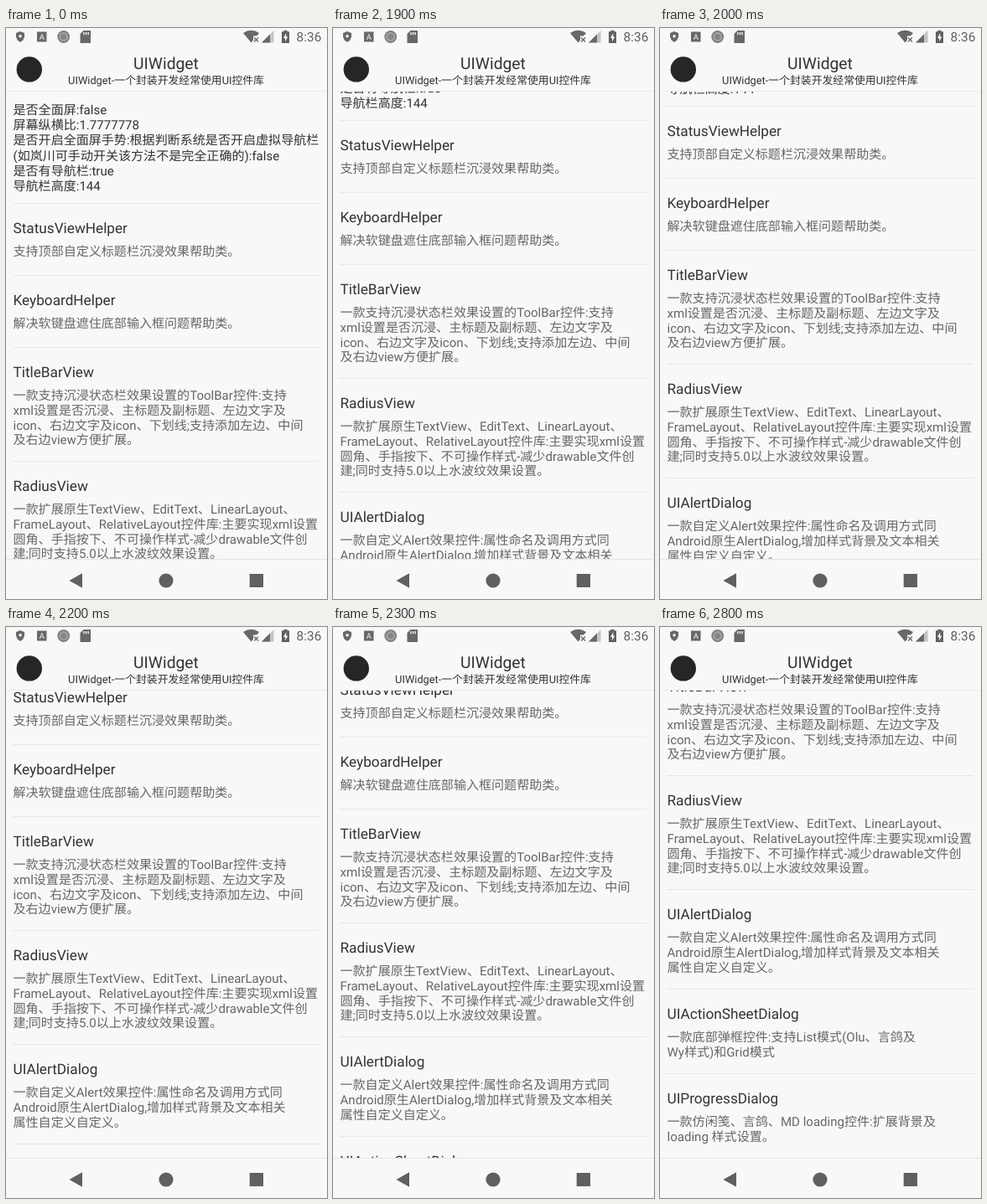
Animation of 383x682 px, one loop 4.1 s. Source, as an HTML page with a canvas:

```html
<!DOCTYPE html>
<html lang="zh-CN">
<head>
<meta charset="utf-8">
<title>UIWidget</title>
<style>
  html, body { margin: 0; width: 100%; height: 100%; overflow: hidden; background: #f8f8f8; }
  canvas { display: block; width: 383px; height: 682px; }
</style>
</head>
<body>
<canvas id="stage"></canvas>
<script>
const W = 383, H = 682, LOOP = 4100;
const LIST_TOP = 76, LIST_BOTTOM = 634, LEFT = 8.5;
const BG = '#f8f8f8', DARK = '#333', GRAY = '#666', LINE = '#e7e7e7', ICON = '#686868';
const FAMILY = 'Roboto, "Noto Sans CJK SC", "Noto Sans CJK", sans-serif';

const canvas = document.getElementById('stage');
const ctx = canvas.getContext('2d');
const dpr = window.devicePixelRatio || 1;
canvas.width = W * dpr;
canvas.height = H * dpr;
ctx.textRendering = 'geometricPrecision'; // keep fractional glyph advances

const info = [
  '是否全面屏:false',
  '屏幕纵横比:1.7777778',
  '是否开启全面屏手势:根据判断系统是否开启虚拟导航栏',
  '(如岚川可手动开关该方法不是完全正确的):false',
  '是否有导航栏:true',
  '导航栏高度:144'
];

const items = [
  ['StatusViewHelper', '支持顶部自定义标题栏沉浸效果帮助类。'],
  ['KeyboardHelper', '解决软键盘遮住底部输入框问题帮助类。'],
  ['TitleBarView',
    '一款支持沉浸状态栏效果设置的ToolBar控件:支持',
    'xml设置是否沉浸、主标题及副标题、左边文字及',
    'icon、右边文字及icon、下划线;支持添加左边、中间',
    '及右边view方便扩展。'],
  ['RadiusView',
    '一款扩展原生TextView、EditText、LinearLayout、',
    'FrameLayout、RelativeLayout控件库:主要实现xml设置',
    '圆角、手指按下、不可操作样式-减少drawable文件创',
    '建;同时支持5.0以上水波纹效果设置。'],
  ['UIAlertDialog',
    '一款自定义Alert效果控件:属性命名及调用方式同',
    'Android原生AlertDialog,增加样式背景及文本相关',
    '属性自定义自定义。'],
  ['UIActionSheetDialog',
    '一款底部弹框控件:支持List模式(Olu、言鸽及',
    'Wy样式)和Grid模式'],
  ['UIProgressDialog',
    '一款仿闲笺、言鸽、MD loading控件:扩展背景及',
    'loading 样式设置。']
];
const itemHeight = [86, 101, 119, 136]; // by number of description lines

const scrollSteps = [
  [0, 0], [1800, 78], [1900, 99], [2000, 116], [2100, 142],
  [2200, 155], [2300, 164], [2700, 262], [2800, 340]
];

function scrollAt(t) {
  let y = 0;
  for (const [start, offset] of scrollSteps) if (t >= start) y = offset;
  return y;
}

function text(str, x, y, size, color, align = 'left') {
  ctx.font = `${size}px ${FAMILY}`;
  ctx.fillStyle = color;
  ctx.textAlign = align;
  ctx.fillText(str, x, y);
}

function rect(x, y, w, h, color) {
  ctx.fillStyle = color;
  ctx.fillRect(x, y, w, h);
}

function disc(x, y, r, color) {
  ctx.fillStyle = color;
  ctx.beginPath();
  ctx.arc(x, y, r, 0, Math.PI * 2);
  ctx.fill();
}

function poly(color, ...pts) {
  ctx.fillStyle = color;
  ctx.beginPath();
  for (let i = 0; i < pts.length; i += 2) ctx.lineTo(pts[i], pts[i + 1]);
  ctx.closePath();
  ctx.fill();
}

function drawList(offset) {
  ctx.save();
  ctx.beginPath();
  ctx.rect(0, LIST_TOP, W, LIST_BOTTOM - LIST_TOP);
  ctx.clip();
  ctx.translate(0, -offset);
  info.forEach((s, i) => text(s, LEFT, 103 + i * 18.2, 15.05, DARK));
  let y = 209;
  for (const [title, ...lines] of items) {
    rect(8, y, 366, 1, LINE);
    text(title, LEFT, y + 36, 17.2, DARK);
    lines.forEach((s, i) => text(s, LEFT, y + 63.3 + i * 17.65, 15.05, GRAY));
    y += itemHeight[lines.length - 1];
  }
  ctx.restore();
}

function drawStatusBar() {
  // shield
  poly(ICON, 17, 4, 22, 6, 22, 10.5, 20.3, 14.5, 17, 17, 13.7, 14.5, 12, 10.5, 12, 6);
  disc(17, 9.8, 1.7, BG);
  // letter tile
  rect(37, 4.5, 11.5, 12, ICON);
  text('A', 42.8, 14, 9.5, BG, 'center');
  // progress disc
  disc(68.7, 10.5, 7.4, '#808080');
  disc(68.7, 10.5, 5.4, '#a4a4a4');
  disc(68.7, 10.5, 3.6, '#858585');
  // memory card
  poly(ICON, 92.5, 3, 101, 3, 101, 18, 88.5, 18, 88.5, 7);
  for (let i = 0; i < 3; i++) rect(92.3 + i * 2.6, 5, 1.3, 3.2, BG);
  // wifi without connection
  ctx.fillStyle = ICON;
  ctx.beginPath();
  ctx.moveTo(292.5, 17.5);
  ctx.lineTo(283, 6);
  ctx.quadraticCurveTo(292.5, -0.5, 302, 6);
  ctx.closePath();
  ctx.fill();
  rect(295, 9.5, 8, 9, BG);
  ctx.strokeStyle = ICON;
  ctx.lineWidth = 1.4;
  ctx.beginPath();
  ctx.moveTo(296, 11.5); ctx.lineTo(301, 16.5);
  ctx.moveTo(301, 11.5); ctx.lineTo(296, 16.5);
  ctx.stroke();
  // signal
  poly('#c4c4c4', 305, 17.5, 319.5, 17.5, 319.5, 3);
  poly(ICON, 305, 17.5, 315, 17.5, 315, 7.5);
  // charging battery
  rect(331.5, 2.8, 4, 2, '#5f5f5f');
  rect(329, 4.3, 9, 13.7, '#5f5f5f');
  poly(BG, 334.3, 6, 331, 12, 333, 12, 333, 16.3, 336.3, 10.4, 334.3, 10.4);
  text('8:36', 376.3, 16, 15.4, '#606060', 'right');
}

function drawHeader() {
  disc(27.8, 49.4, 15.2, '#262626');
  text('UIWidget', 191, 48.5, 19.3, DARK, 'center');
  text('UIWidget-一个封装开发经常使用UI控件库', 191, 67.4, 12.84, DARK, 'center');
  rect(0, 75, W, 1, '#ececec');
}

function drawNavBar() {
  rect(0, 634, W, 1, '#e4e4e4');
  poly('#606060', 75.5, 660, 91, 651.2, 91, 668.8);
  disc(191, 660, 8.6, '#606060');
  rect(290.7, 652, 16.3, 16, '#606060');
}

const begin = performance.now();

function draw() {
  const t = (performance.now() - begin) % LOOP;
  ctx.setTransform(dpr, 0, 0, dpr, 0, 0);
  rect(0, 0, W, H, BG);
  drawList(scrollAt(t));
  drawStatusBar();
  drawHeader();
  drawNavBar();
  requestAnimationFrame(draw);
}
draw();
</script>
</body>
</html>
```
